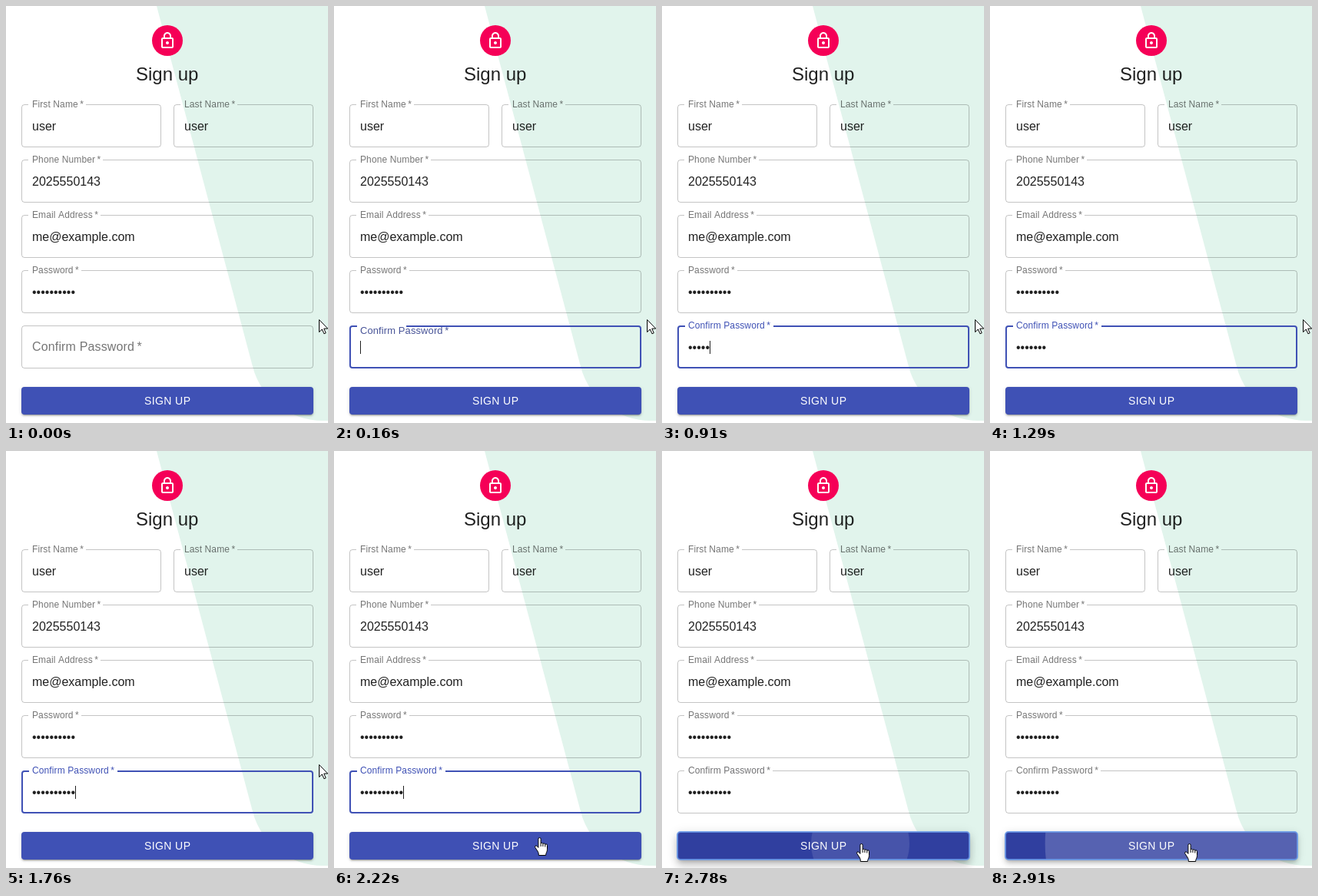
Animation of 419 by 543 pixels, one loop 2990 ms. Source, as an HTML page with a canvas:

```html
<!DOCTYPE html>
<html lang="en">
<head>
<meta charset="utf-8">
<title>Sign up</title>
<style>
html, body { margin: 0; width: 100%; height: 100%; overflow: hidden; background: #fff; }
canvas { display: block; }
</style>
</head>
<body>
<canvas id="stage" width="419" height="543"></canvas>
<script>
const ctx = document.getElementById('stage').getContext('2d');
const LOOP = 2990;
const FONT = '"Liberation Sans", Arial, sans-serif';
const INK = 'rgba(0,0,0,0.87)';
const GREY = [0, 0, 0, 0.54];
const BLUE = [63, 81, 181, 1];
const NAVY = [48, 63, 159, 1];

// Timeline in ms
const FOCUS = 80, MOVE = 1840, ARRIVE = 2220, HOVER = 2195, REST = 2400;
const PRESS = 2637, RELEASE = 2800;
const KEYS = [450, 600, 690, 770, 840, 920, 1000, 1370, 1450, 1600];
const CARET_OFF = [1220, 1370];

const BUTTON = { x: 20, y: 496, w: 380, h: 36 };
const START = [407, 408], ENTER = [267, 503], END = [259, 511];

// Each layer: dy, blur, spread, alpha
const SHADOWS = {
  rest: [[3, 1, -2, 0.2], [2, 2, 0, 0.14], [1, 5, 0, 0.12]],
  hover: [[2, 4, -1, 0.2], [4, 5, 0, 0.14], [1, 10, 0, 0.12]],
  active: [[5, 5, -3, 0.2], [8, 10, 1, 0.14], [3, 14, 2, 0.12]]
};

const LOCK = new Path2D('M12 17c1.1 0 2-.9 2-2s-.9-2-2-2-2 .9-2 2 .9 2 2 2zm6-9h-1V6c0-2.76-2.24-5-5-5S7 3.24 7 6v2H6c-1.1 0-2 .9-2 2v10c0 1.1.9 2 2 2h12c1.1 0 2-.9 2-2V10c0-1.1-.9-2-2-2zM8.9 6c0-1.71 1.39-3.1 3.1-3.1s3.1 1.39 3.1 3.1v2H8.9V6zM18 20H6V10h12v10z');
const ARROW = new Path2D('M.5 .5V16.6L4.3 13L6.9 18.8L9.2 17.8L6.7 12.1H11.7Z');
const HAND = new Path2D('M6.5 .5Q4.9 .5 4.9 2.2V13.4L3.5 11.8Q2.2 10.4 1 11.2Q.1 12 .9 13.4L4.6 19.2Q5.3 20.3 5.3 23.5H14.6Q14.6 21.4 15.6 19.6Q16.5 18 16.5 15.5V10.4Q16.5 8.9 15.2 8.9Q14.3 8.9 13.8 9.4Q13.5 8 12.2 8Q11.3 8 10.8 8.6Q10.4 7.3 9.2 7.3Q8.5 7.3 8.1 7.7V2.2Q8.1 .5 6.5 .5Z');
const KNUCKLES = new Path2D('M8.1 7.5V12M10.9 8.6V12M13.8 9.4V12.5');

const clamp = v => Math.min(1, Math.max(0, v));
const lerp = (a, b, p) => a + (b - a) * p;
const mix = (a, b, p) => a.map((v, i) => lerp(v, b[i], p));
const rgba = c => `rgba(${c.join(',')})`;

// CSS cubic-bezier with end control points (x1, 0) and (0.2, 1)
function ease(p, x1) {
  p = clamp(p);
  let lo = 0, hi = 1;
  for (let i = 0; i < 24; i++) {
    const s = (lo + hi) / 2, r = 1 - s;
    if (3 * r * r * s * x1 + 0.6 * r * s * s + s * s * s < p) lo = s; else hi = s;
  }
  return 3 * lo * lo - 2 * lo * lo * lo;
}
const easeOut = p => ease(p, 0);
const easeInOut = p => ease(p, 0.4);

function text(str, x, y, size, color, spacing = 0) {
  ctx.font = `${size}px ${FONT}`;
  ctx.letterSpacing = spacing + 'px';
  ctx.fillStyle = color;
  ctx.fillText(str, x, y);
  return ctx.measureText(str).width;
}

// Label with a thin space before its asterisk
function label(str, x, y, size, color) {
  const gap = size * 0.00938;
  const w = text(str, x, y, size, color, gap) + size * 0.2 + gap;
  return w + text('*', x + w, y, size, color, gap);
}

function outline(x, y, w, from, to, width, color) {
  const o = width / 2, l = x + o, t = y + o, r = x + w - o, b = y + 56 - o, rad = 4 - o;
  ctx.beginPath();
  ctx.moveTo(to, t);
  ctx.arcTo(r, t, r, b, rad);
  ctx.arcTo(r, b, l, b, rad);
  ctx.arcTo(l, b, l, t, rad);
  ctx.arcTo(l, t, r, t, rad);
  ctx.lineTo(from, t);
  ctx.lineWidth = width;
  ctx.strokeStyle = color;
  ctx.stroke();
}

const BORDER = 'rgba(0,0,0,0.23)';

function field(name, value, x, y, w) {
  const lw = label(name, x + 14, y + 4, 12, rgba(GREY));
  outline(x, y, w, x + 9, Math.round(x + 17 + lw), 1, BORDER);
  text(value, x + 14, y + 34, 16, INK);
}

function confirmField(t) {
  const x = 20, y = 416;
  const focused = t >= FOCUS && t < PRESS;
  const p = easeOut((t - FOCUS) / 200);
  const tint = t < PRESS ? p : 1 - easeOut((t - PRESS) / 200);
  const lw = label('Confirm Password', x + 14, y + lerp(33, 4, p), lerp(16, 12, p), rgba(mix(GREY, BLUE, tint)));
  const open = clamp((t - FOCUS - 50) / 60);
  const edge = focused ? 1 : 0, from = x + 9 + edge;
  const to = lerp(from, Math.round(x + 17 + lw + edge), open);
  outline(x, y, 380, from, to, focused ? 2 : 1, focused ? rgba(BLUE) : BORDER);

  const count = KEYS.filter(k => t >= k).length;
  text('•'.repeat(count), x + 14, y + 34, 16, INK);
  const blinkOff = t >= CARET_OFF[0] && t < CARET_OFF[1];
  if (focused && !blinkOff) {
    ctx.fillStyle = INK;
    ctx.fillRect(Math.round(x + 14 + count * 5.6), y + 20, 1, 17);
  }
}

function buttonPath(grow = 0) {
  const { x, y, w, h } = BUTTON;
  ctx.beginPath();
  ctx.roundRect(x - grow, y - grow, w + 2 * grow, h + 2 * grow, Math.max(0, 4 + grow));
}

function shadow([dy, blur, spread, alpha]) {
  const away = 1000;
  ctx.save();
  ctx.translate(-away, 0);
  ctx.shadowOffsetX = away;
  ctx.shadowOffsetY = dy;
  ctx.shadowBlur = blur;
  ctx.shadowColor = `rgba(0,0,0,${alpha})`;
  ctx.fillStyle = '#000';
  buttonPath(spread);
  ctx.fill();
  ctx.restore();
}

function button(t) {
  const hover = easeInOut((t - HOVER) / 250);
  const press = easeInOut((t - PRESS) / 250) * (1 - easeInOut((t - RELEASE) / 250));
  SHADOWS.rest.forEach((s, i) => shadow(mix(mix(s, SHADOWS.hover[i], hover), SHADOWS.active[i], press)));
  buttonPath();
  ctx.fillStyle = rgba(mix(BLUE, NAVY, hover));
  ctx.fill();
  text('SIGN UP', 180, 519, 14, '#fff', 0.4);
  if (t < PRESS) return;

  const p = easeInOut((t - PRESS) / 550);
  ctx.save();
  buttonPath();
  ctx.clip();
  ctx.beginPath();
  ctx.arc(END[0] - 1, END[1], 241 * p, 0, 7);
  ctx.fillStyle = `rgba(255,255,255,${0.07 + 0.15 * p})`;
  ctx.fill();
  ctx.restore();

  buttonPath();
  ctx.lineWidth = 2;
  ctx.strokeStyle = 'rgba(104,152,232,0.85)';
  ctx.stroke();
}

function pointer(t) {
  const go = Math.pow(clamp((t - MOVE) / (ARRIVE - MOVE)), 1.3);
  const settle = easeOut((t - ARRIVE) / (REST - ARRIVE));
  const [x, y] = mix(mix(START, ENTER, go), END, settle).map(Math.round);
  const hand = y >= BUTTON.y;
  ctx.save();
  ctx.translate(hand ? x - 6 : x, y);
  ctx.lineWidth = 1;
  ctx.lineJoin = 'round';
  ctx.fillStyle = '#fff';
  ctx.strokeStyle = '#000';
  const shape = hand ? HAND : ARROW;
  ctx.fill(shape);
  ctx.stroke(shape);
  if (hand) ctx.stroke(KNUCKLES);
  ctx.restore();
}

function backdrop() {
  ctx.fillStyle = '#fff';
  ctx.fillRect(0, 0, 419, 543);
  ctx.fillStyle = '#e1f4ec';
  ctx.beginPath();
  ctx.moveTo(196, 0);
  ctx.arc(412, 446, 94, Math.PI * 0.917, Math.PI / 2, true);
  ctx.lineTo(419, 540);
  ctx.lineTo(419, 0);
  ctx.fill();
}

function header() {
  ctx.fillStyle = '#f50057';
  ctx.beginPath();
  ctx.arc(210, 45, 20, 0, 7);
  ctx.fill();
  ctx.save();
  ctx.translate(198, 33);
  ctx.fillStyle = '#fff';
  ctx.fill(LOCK);
  ctx.restore();
  text('Sign up', 169, 97, 24, INK);
}

function draw(t) {
  backdrop();
  header();
  field('First Name', 'user', 20, 128, 182);
  field('Last Name', 'user', 218, 128, 182);
  field('Phone Number', '2025550143', 20, 200, 380);
  field('Email Address', 'me@example.com', 20, 272, 380);
  field('Password', '•'.repeat(10), 20, 344, 380);
  confirmField(t);
  button(t);
  pointer(t);
}

const begin = performance.now();
function tick() {
  draw((performance.now() - begin) % LOOP);
  requestAnimationFrame(tick);
}
tick();
</script>
</body>
</html>
```
